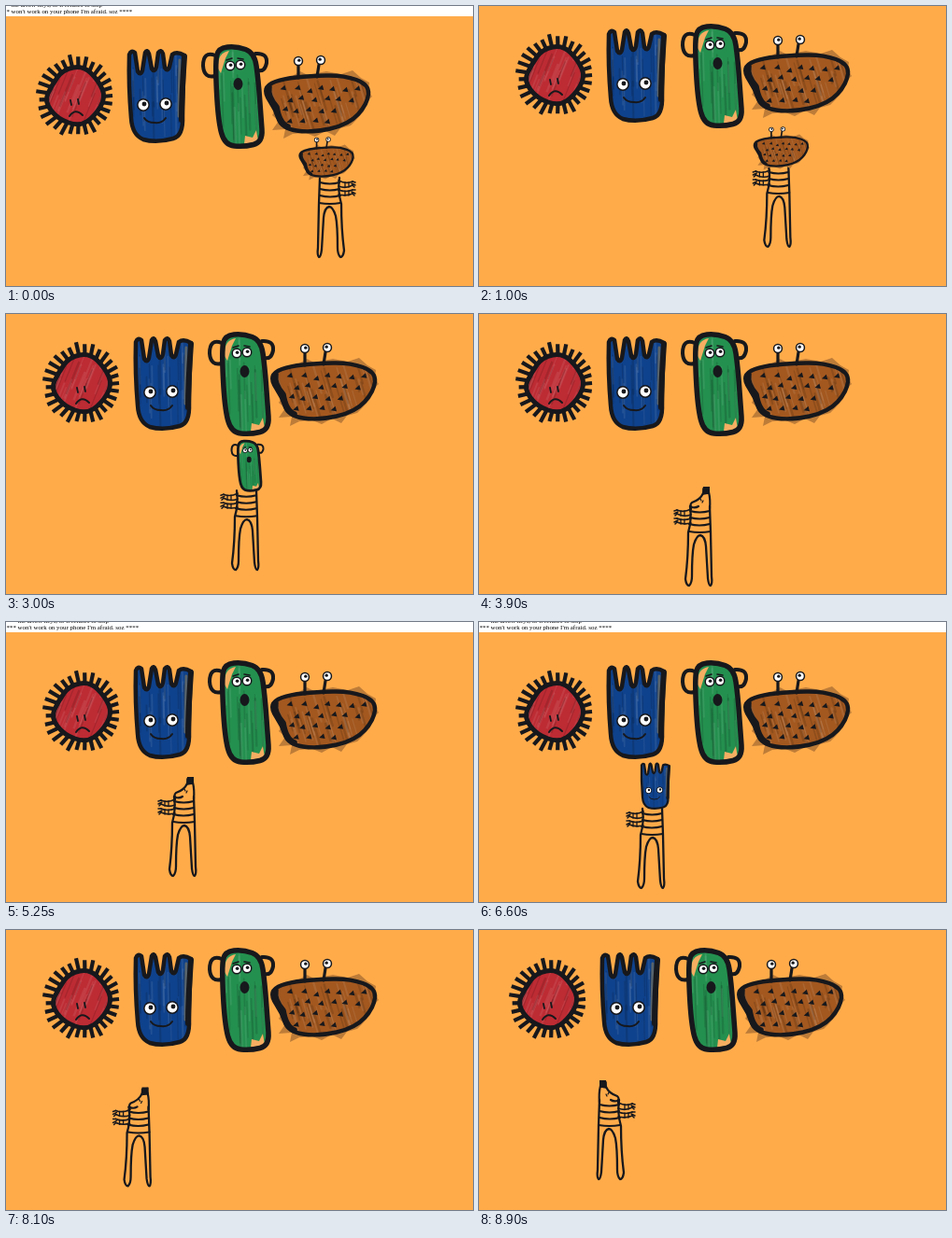
Animation, 500 px wide and 300 px high, one loop 8.95 s. Source, as an HTML page with a canvas:

```html
<!DOCTYPE html>
<html lang="en">
<head>
<meta charset="utf-8">
<title>Head swapper</title>
<style>
html, body { margin: 0; width: 100%; height: 100%; overflow: hidden; background: #ffab4a; }
canvas { display: block; width: 500px; height: 300px; }
</style>
</head>
<body>
<canvas id="stage" width="500" height="300"></canvas>
<script>
const ctx = document.getElementById('stage').getContext('2d');
const LOOP = 8950;
const INK = '#17181c';
const SKIN = '#ffab4a';

// time, x, y of the feet on the page
const walk = [
  [0, 354, 269], [150, 354, 269], [500, 340, 280], [950, 322, 280],
  [2100, 284, 279], [2350, 276, 273], [2550, 270, 276], [2900, 260, 290],
  [3400, 245, 321], [3650, 240, 314], [3900, 236, 313], [4550, 215, 313],
  [5250, 190, 272], [5450, 190, 268], [6000, 189, 288], [6600, 185, 285],
  [7100, 172, 276], [7350, 162, 279.5], [7900, 145, 297], [8250, 139, 296],
  [8900, 147, 289], [LOOP, 147, 289]
];
// start, end, new value
const scrollY = [
  [400, 650, 22], [2150, 2350, 0], [2480, 2720, 22], [4570, 4820, 0],
  [5500, 5750, 22], [6050, 6280, 0], [7040, 7600, 22]
];
const scrollX = [[120, 320, 0], [8300, 8500, 7]];

function pose(t) {
  let i = 1;
  while (i < walk.length - 1 && walk[i][0] < t) i++;
  const a = walk[i - 1], b = walk[i];
  const p = (t - a[0]) / (b[0] - a[0]);
  return { x: a[1] + (b[1] - a[1]) * p, y: a[2] + (b[2] - a[2]) * p };
}

function scrollAt(steps, start, t) {
  let v = start;
  for (const [from, to, end] of steps) {
    if (t < from) break;
    const p = Math.min(1, (t - from) / (to - from));
    v += (end - v) * (1 - (1 - p) * (1 - p));
  }
  return v;
}

function random(seed) {
  return () => (seed = (seed * 16807) % 2147483647) / 2147483647;
}

// closed smooth curve around the given corner points
function blob(pts) {
  const path = new Path2D();
  const mid = (a, b) => [(a[0] + b[0]) / 2, (a[1] + b[1]) / 2];
  path.moveTo(...mid(pts[pts.length - 1], pts[0]));
  pts.forEach((p, i) => path.quadraticCurveTo(...p, ...mid(p, pts[(i + 1) % pts.length])));
  path.closePath();
  return path;
}

function line(d, width, color = INK) {
  ctx.strokeStyle = color;
  ctx.lineWidth = width;
  ctx.stroke(typeof d === 'string' ? new Path2D(d) : d);
}

function fill(path, color) {
  ctx.fillStyle = color;
  ctx.fill(typeof path === 'string' ? new Path2D(path) : path);
}

function oval(x, y, rx, ry, color) {
  ctx.beginPath();
  ctx.ellipse(x, y, rx, ry, 0, 0, 7);
  ctx.fillStyle = color;
  ctx.fill();
}

function eye(x, y, r, px, py) {
  oval(x, y, r + 1.5, r + 1.5, INK);
  oval(x, y, r, r, '#fff');
  oval(x + px, y + py, r * 0.45, r * 0.45, INK);
}

// felt-tip strokes inside a shape
function marker(path, color, seed, x, y, w, h, lean) {
  const rnd = random(seed);
  ctx.save();
  ctx.clip(path);
  ctx.fillStyle = color;
  ctx.fillRect(x, y, w, h);
  for (let i = 0; i < w / 2; i++) {
    const sx = x + rnd() * w, sy = y + rnd() * h * 0.6, len = h * (0.2 + rnd() * 0.4);
    ctx.beginPath();
    ctx.moveTo(sx, sy);
    ctx.lineTo(sx + lean * len, sy + len);
    ctx.strokeStyle = rnd() < 0.5 ? 'rgba(0,0,0,.13)' : 'rgba(255,255,255,.08)';
    ctx.lineWidth = 1 + rnd() * 1.5;
    ctx.stroke();
  }
  ctx.restore();
}

const redShape = blob([[56, 85], [68, 68], [90, 64], [106, 80], [114, 98], [102, 118], [86, 129], [62, 121], [48, 102]]);
const blueShape = new Path2D('M139 52 Q141 47 145 50 L148 70 Q151 75 153 69 L156 50 Q158 46 160 51 L163 67 Q166 72 168 65 L170 50 Q173 46 175 51 L177 66 Q180 71 182 65 L185 52 Q190 48 198 53 Q196 100 196 118 Q197 139 186 142 Q168 147 154 143 Q142 138 141 120 Q138 85 139 52Z');
const greenShape = blob([[231, 62], [234, 45], [254, 43], [273, 50], [277, 78], [280, 118], [282, 146], [262, 151], [241, 149], [234, 122]]);
const brownShape = blob([[287, 84], [304, 78], [332, 75], [368, 74], [396, 84], [394, 105], [374, 127], [334, 136], [302, 131], [295, 110], [284, 94]]);

function redHead() {
  ctx.lineCap = 'butt';
  const rnd = random(77);
  const n = 29;
  for (let i = 0; i < n; i++) {
    const a = i / n * Math.PI * 2;
    const c = Math.cos(a), s = Math.sin(a), r = 39 + rnd() * 5;
    ctx.beginPath();
    ctx.moveTo(83 + c * 27, 97 + s * 29);
    ctx.lineTo(82 + c * r, 96 + s * (r + 1));
    ctx.strokeStyle = INK;
    ctx.lineWidth = 4.2;
    ctx.stroke();
  }
  marker(redShape, '#bd2b33', 5, 48, 62, 70, 70, -0.4);
  ctx.lineCap = 'round';
  line(redShape, 5);
  line('M76 101 L77 106 M84 100 L85 105', 1.8);
  line('M75 118 Q81 109 89 117', 2);
}

function blueHead() {
  marker(blueShape, '#0f428c', 11, 136, 44, 66, 106, 0.02);
  line('M193 58 L192 118', 3, '#59646b');
  line(blueShape, 4.5);
  line('M198 54 Q195 95 195 122', 6);
  eye(154, 106, 5.4, 1, -1);
  eye(178, 105, 5.4, 1, -1);
  line('M155 120 Q158 125 166 125 Q174 126 178 120', 2);
}

function greenHead() {
  line('M231 53 Q218 48 218 64 Q219 78 231 75', 4);
  line('M274 51 Q287 50 286 61 Q284 71 277 69', 4);
  marker(greenShape, '#24904f', 23, 230, 42, 54, 112, 0.03);
  fill('M234 67 Q233 50 246 48 L242 56 L237 72Z M262 148 L263 139 L271 141 L275 133 L277 145Z', '#f5ae62');
  line(greenShape, 5.5);
  eye(247, 64, 4, 0.6, -0.8);
  eye(258, 63, 4, 0.6, -0.8);
  line('M243 58 L249 56 M255 56 L261 57', 1.6);
  oval(255.5, 83.5, 5, 6.5, INK);
}

function brownHead() {
  fill('M296 86 L312 76 L322 70 L330 74 L350 70 L366 73 L378 69 L387 77 L396 82 L395 91 L399 97 L391 104 L390 113 L382 122 L376 128 L365 131 L359 139 L349 134 L338 140 L328 136 L314 137 L304 142 L306 132 L292 133 L299 123 L292 117 L297 108Z', '#bd7c38');
  marker(brownShape, '#a3581f', 31, 284, 72, 114, 66, 0.3);
  ctx.fillStyle = INK;
  const rnd = random(9);
  for (let r = 0; r < 4; r++) {
    for (let c = 0; c < 7 - r * 0.6; c++) {
      const x = 304 + c * 13 + (r % 2) * 6 + rnd() * 3, y = 87 + r * 11 + rnd() * 4;
      if (x > 387 - r * 8) continue;
      ctx.beginPath();
      ctx.moveTo(x - 3.4, y + 1.5);
      ctx.lineTo(x + 1.5, y - 3);
      ctx.lineTo(x + 3, y + 2.5);
      ctx.fill();
    }
  }
  line(brownShape, 4.4);
  line('M289 87 Q287 97 297 108 Q300 126 309 129', 5.5);
  line('M320 77 L320 63 M340 76 L342 63', 3.2);
  eye(320, 59, 3.7, 0.8, -0.8);
  eye(344, 58, 3.7, -0.8, -0.8);
}

// drawing, centre x, bottom y, reach, size when worn
const heads = [
  { draw: redHead, x: 83, bottom: 139, reach: 18, size: 0.5 },
  { draw: blueHead, x: 168, bottom: 147, reach: 20, size: 0.5 },
  { draw: greenHead, x: 256, bottom: 152, reach: 18, size: 0.5 },
  { draw: brownHead, x: 341, bottom: 139, reach: 26, size: 0.52 }
];

function body(bare) {
  line('M-10 -85 Q-8 -70 -12 -57 Q-12 -30 -15 -7 Q-14 0 -11 0 Q-8 -3 -8 -10 Q-8 -34 -6 -44 Q-3 -54 1 -54 Q6 -53 7 -42 L9 -8 Q10 0 12 0 Q14 -2 13 -10 L12 -57 L11 -85', 2.3);
  line('M-10 -80 Q0 -77 11 -80 M-10 -73 Q0 -70 11 -73 M-11 -66 Q0 -63 11 -66 M-11 -58 Q0 -56 12 -58', 2);
  line('M-9 -82 Q-17 -78 -24 -81 M-9 -76 Q-17 -73 -24 -77 M-9 -72 Q-17 -69 -24 -72 M-9 -67 Q-17 -65 -24 -68', 1.7);
  line('M-16 -80 L-16 -75 M-20 -80 L-20 -75 M-16 -71 L-16 -66 M-20 -71 L-20 -66', 1.3);
  line('M-24 -81 L-27 -80 M-23 -79 L-27 -77 M-24 -77 L-26 -75 M-24 -72 L-27 -72 M-23 -70 L-27 -68 M-24 -68 L-26 -66', 1.5);
  if (!bare) return;
  line('M4 -99 Q1 -92 -8 -89 Q-11 -86 -8 -84 Q-4 -83 -1 -85 M10 -100 Q12 -92 11 -82 M-10 -85 L-9 -82', 2.2);
  fill('M3 -98 L4 -106 L11 -106 L11 -98Z', INK);
  line('M4 -104 L10 -105 L10 -99 L4 -98Z', 1.5);
  line('M1 -93 L2 -91 M4 -91 L3 -89', 1.2);
}

function figure(p, right) {
  const worn = p.y < 300 && heads.find(h => Math.abs(p.x - h.x) < h.reach);
  const side = right ? -1 : 1;
  ctx.save();
  ctx.translate(p.x, p.y);
  ctx.save();
  ctx.scale(side, 1);
  body(!worn);
  ctx.restore();
  if (worn) {
    ctx.translate(side * 3.5, -84);
    ctx.scale(worn.size, worn.size);
    ctx.translate(-worn.x, -worn.bottom);
    worn.draw();
  }
  ctx.restore();
}

function notes() {
  ctx.fillStyle = '#fff';
  ctx.fillRect(-5, -20, 530, 31);
  ctx.fillStyle = '#000';
  ctx.font = '6.93px "Liberation Serif", "Times New Roman", serif';
  ctx.fillText('*** the arrow keys, or it refuses to stop', 0.5, 0.6);
  ctx.fillText("*** won't work on your phone I'm afraid. soz ****", 0.5, 8.4);
}

function frame(now) {
  const t = now % LOOP;
  const right = t < 120 || t >= 8300;
  ctx.fillStyle = SKIN;
  ctx.fillRect(0, 0, 500, 300);
  ctx.save();
  ctx.lineJoin = ctx.lineCap = 'round';
  ctx.translate(-scrollAt(scrollX, 7, t), -scrollAt(scrollY, 0, t));
  notes();
  for (const h of heads) h.draw();
  figure(pose(t), right);
  ctx.restore();
}

let begin;
function tick(now) {
  if (begin === undefined) begin = now;
  frame(now - begin);
  requestAnimationFrame(tick);
}
frame(0);
requestAnimationFrame(tick);
</script>
</body>
</html>
```
